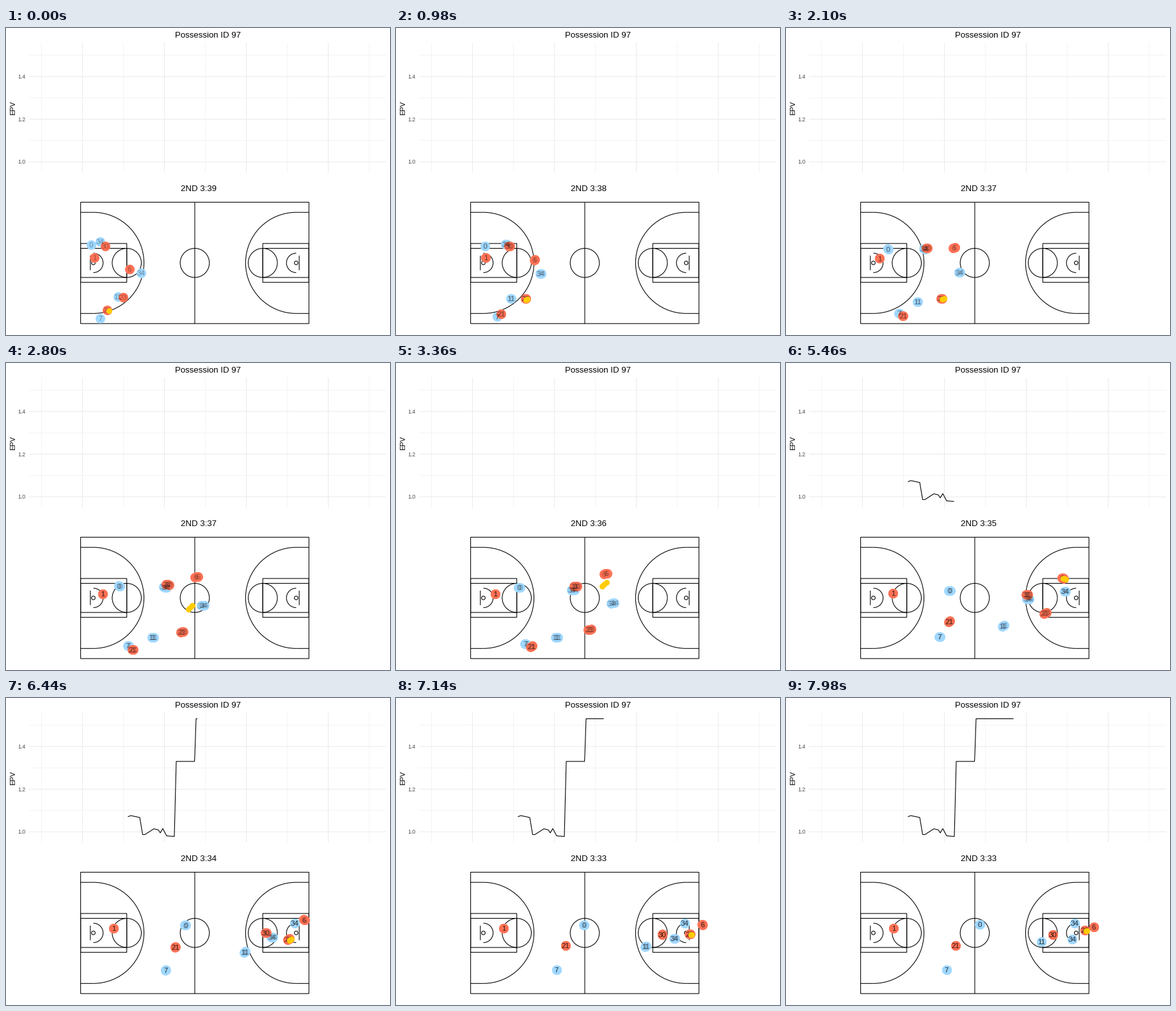
Animation of 600x480 px, one loop 8000 ms. Source, as a matplotlib script:

```python
import matplotlib.pyplot as plt
import numpy as np
from matplotlib.animation import FuncAnimation
from matplotlib.patches import Arc, Circle, Rectangle

plt.rcParams["font.family"] = ["Liberation Sans", "DejaVu Sans"]

W, H, DPI = 600, 480, 100
PX = 72 / DPI                      # points per pixel
FRAME_MS, STEP_MS, LOOP_MS = 40, 140, 8000
BLUE, CORAL, GOLD, GRID = "#A0D8FF", "#FF7256", "#FFCC00", "#EBEBEB"

fig = plt.figure(figsize=(W / DPI, H / DPI), dpi=DPI, facecolor="white")
ax = fig.add_axes([0, 0, 1, 1])
ax.set(xlim=(0, W), ylim=(H, 0))
ax.axis("off")


def label(x, y, s, px, **kw):
    kw = {"ha": "center", "va": "baseline", "color": "black"} | kw
    return ax.text(x, y, s, fontsize=px * PX, **kw)


def line(x, y, color="black", px=1.07, z=2):
    return ax.plot(x, y, color=color, lw=px * PX, zorder=z, snap=False,
                   solid_capstyle="butt")[0]


# Chart
LEFT, RIGHT, TOP, BOTTOM = 36, 594, 23, 226


def epv_y(value):
    return 209.2 - 333.5 * (value - 1)


for i in range(9):
    x = 55.5 + 64 * i
    line([x, x], [TOP, BOTTOM], GRID, 1.07 if i % 2 else 0.53, 1)
for i in range(6):
    y = epv_y(1 + i / 10)
    line([LEFT, RIGHT], [y, y], GRID, 0.53 if i % 2 else 1.07, 1)
    if i % 2 == 0:
        label(31, y + 3.2, f"{1 + i / 10:.1f}", 8.8, ha="right", color="#4D4D4D")

label(315, 15, "Possession ID 97", 13.2)
label(11, 124.5, "EPV", 11, rotation=90, va="center")
clock = label(301, 255.3, "", 13.2)

# Court, measured in feet
FT, X0, Y0 = 3.795, 116.6, 272.4
ARC = 20.83
PEN = dict(fill=False, ec="black", lw=1.07 * PX, zorder=2, snap=False)


def rect(x, y, w, h):
    ax.add_patch(Rectangle((X0 + x * FT, Y0 + y * FT), w * FT, h * FT, **PEN))


def ring(x, r):
    ax.add_patch(Circle((X0 + x * FT, Y0 + 25 * FT), r * FT, **PEN))


def half_ring(x, r, side):
    a = -90 if side > 0 else 90
    ax.add_patch(Arc((X0 + x * FT, Y0 + 25 * FT), 2 * r * FT, 2 * r * FT,
                     theta1=a, theta2=a + 180, **PEN))


def seg(x1, y1, x2, y2):
    line([X0 + x1 * FT, X0 + x2 * FT], [Y0 + y1 * FT, Y0 + y2 * FT])


rect(0, 0, 94, 50)
seg(47, 0, 47, 50)
ring(47, 6)
for base, side in ((0, 1), (94, -1)):
    hoop = base + 5.25 * side
    rect(base, 17, 19 * side, 16)
    rect(base, 19, 19 * side, 12)
    ring(base + 19 * side, 6)
    ring(hoop, 0.75)
    half_ring(hoop, 4, side)
    half_ring(hoop, ARC, side)
    seg(base + 4 * side, 22, base + 4 * side, 28)
    for y in (25 - ARC, 25 + ARC):
        seg(base, y, hoop, y)


def run(start, end, begin, finish, bow=0):
    """Eased run between two spots, bowed sideways; times are in steps."""
    def at(t):
        u = np.clip((t - begin) / (finish - begin), 0, 1)
        e = u * u * (3 - 2 * u)
        x = start[0] + (end[0] - start[0]) * e
        y = start[1] + (end[1] - start[1]) * e
        return np.column_stack([x, y + bow * np.sin(np.pi * (u + e) / 2)])
    return at


blue = [
    ("0", run((132.5, 338.5), (304, 353), 0, 60, 8)),
    ("34", run((140, 332), (448, 377), -6, 59, 3)),
    ("34", run((211, 383), (451, 352), 0, 46, 9)),
    ("11", run((174.5, 419.5), (399.5, 380), 2, 58, 25)),
    ("7", run((145, 455), (251, 425), -5, 50)),
]
lead = run((189, 383), (481, 358), -4, 54, -42)
guard = run((181, 419), (467, 363), -3, 57, 22)
inbounder = run((158, 441), (265, 387), 0, 48, 29)
coral = [
    ("1", run((138, 358.5), (168, 359.5), 0, 44, 2)),
    ("6", lead),
    ("30", run((151, 341), (417, 370), -4, 53, -6)),
    ("23", guard),
    ("21", inbounder),
]
PASSES = [(0, 7, guard), (15, 26, lead), (40, 45, guard)]


def ball(t):
    """The ball stays with its holder and flies straight on each pass."""
    pos = inbounder(t)
    for begin, finish, receiver in PASSES:
        k = np.clip((t - begin) / (finish - begin), 0, 1)[:, None]
        pos = pos + (receiver(t) - pos) * k
    return pos + (2.5, 1)


# Players and ball leave a short trail of samples
SAMPLES = 3


def dots(color, px, z):
    return ax.scatter([], [], s=(px * PX) ** 2, c=color, linewidths=0, zorder=z)


blue_dots, coral_dots, ball_dots = dots(BLUE, 15, 3), dots(CORAL, 15, 4), dots(GOLD, 9, 6)
numbers = [(path, [label(0, 0, name, 11.4, alpha=0.35, zorder=5)
                   for _ in range(SAMPLES)])
           for name, path in blue + coral]

# Expected value: turning points of the curve
TRACE_X, TRACE_SPEED, TRACE_STEP, TRACE_END = 190.5, 5.17, 25, 356
turns = np.array([
    (190, 1.07), (195, 1.076), (209, 1.067), (213.5, 0.987), (217, 0.987),
    (231, 1.014), (238, 1.009), (241, 0.995), (245, 1.015), (251, 0.981),
    (263, 0.978), (266, 1.33), (294.7, 1.33), (297, 1.53)])
trace = line([], [], px=1.1, z=3)


def update(i):
    step = (i * FRAME_MS + FRAME_MS // 2) // STEP_MS
    count = min(SAMPLES, 1 + -(-step // 16))
    t = step + (np.arange(count) - (count - 1) / 2) / SAMPLES

    for team, artist in ((blue, blue_dots), (coral, coral_dots)):
        artist.set_offsets(np.vstack([path(t) for _, path in team]))
    ball_dots.set_offsets(ball(t))

    for path, texts in numbers:
        for text in texts:
            text.set_visible(False)
        for text, (x, y) in zip(texts, path(t)):
            text.set_position((x, y + 4.1))
            text.set_visible(True)

    left = 219 - int((step + 2.7) / 8.6)
    clock.set_text(f"2ND {left // 60}:{left % 60:02d}")

    end = min(TRACE_X + TRACE_SPEED * (step - TRACE_STEP), TRACE_END)
    x = np.arange(TRACE_X, end, 0.5)
    trace.set_data(x, epv_y(np.interp(x, *turns.T)))
    return blue_dots, coral_dots, ball_dots, clock, trace


anim = FuncAnimation(fig, update, frames=LOOP_MS // FRAME_MS, interval=FRAME_MS,
                     repeat=True, repeat_delay=0, blit=False)
plt.show()
```
